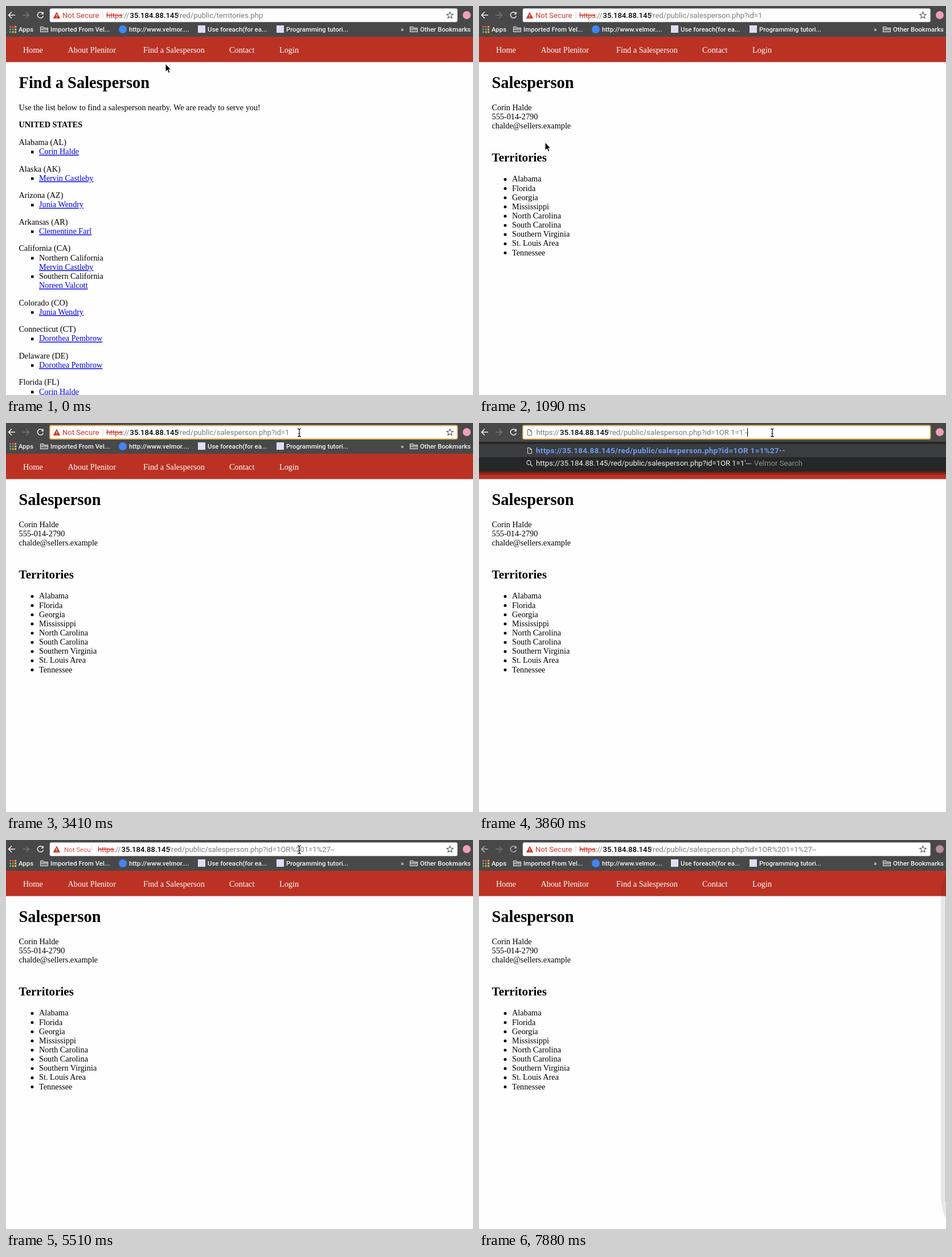
An HTML page for the animation above (8000 ms loop, 820x683 px).

```html
<!DOCTYPE html>
<html lang="en">
<head>
<meta charset="utf-8">
<title>Find a Salesperson</title>
<style>
  html, body { margin: 0; width: 100%; height: 100%; overflow: hidden; background: #fefefe; }
  svg { display: block; width: 820px; height: 683px; }
  text { font: 14.27px "Liberation Serif", Times, serif; white-space: pre; }
  .h1 { font-size: 28.5px; font-weight: 700; }
  .h2 { font-size: 21.1px; font-weight: 700; }
  .b { font-weight: 700; }
  .nav { fill: #fff; }
  .link { fill: #00e; text-decoration: underline; }
  .ui, .ip, .hit { font: 13.1px Roboto, "Liberation Sans", sans-serif; }
  .ip { font-weight: 500; }
  .hit { font-size: 13.4px; font-weight: 700; letter-spacing: .35px; fill: #6c9df5; }
  .mark { font: 500 11.4px Roboto, "Liberation Sans", sans-serif; fill: #f4f4f4; }
  .tight { letter-spacing: -.3px; }
</style>
</head>
<body>
<svg id="stage" viewBox="0 0 820 683"></svg>
<script>
const stage = document.getElementById('stage');
const LOOP = 8000, LINE = 16.2, GAP = 14.2;
const RED = '#d0372b', GRAY = '#7b7b7b';
const IP = '35.184.88.145', PERSON = '/red/public/salesperson.php?id=1';

const text = (x, y, s, cls = '', attr = '') => `<text x="${x}" y="${y}" class="${cls}" ${attr}>${s}</text>`;
const rect = (x, y, w, h, fill, attr = '') => `<rect x="${x}" y="${y}" width="${w}" height="${h}" fill="${fill}" ${attr}/>`;
const path = (d, stroke, fill = 'none', w = 1.5, attr = '') =>
  `<path d="${d}" stroke="${stroke}" fill="${fill}" stroke-width="${w}" ${attr}/>`;
const disc = (x, y, r, fill) => `<circle cx="${x}" cy="${y}" r="${r}" fill="${fill}"/>`;
const fill = c => `fill="${c}"`;
const during = (t, a, b) => t >= a && t < b;
// last entry whose time has been reached
const held = (keys, t) => keys.filter(k => k[0] <= t).pop();

// Names starting with "*" are links; "-" starts a bulleted line.
const territories = [
  ['Alabama (AL)', '-*Corin Halde'],
  ['Alaska (AK)', '-*Mervin Castleby'],
  ['Arizona (AZ)', '-*Junia Wendry'],
  ['Arkansas (AR)', '-*Clementine Farl'],
  ['California (CA)', '-Northern California', '*Mervin Castleby', '-Southern California', '*Noreen Valcott'],
  ['Colorado (CO)', '-*Junia Wendry'],
  ['Connecticut (CT)', '-*Dorothea Pembrow'],
  ['Delaware (DE)', '-*Dorothea Pembrow'],
  ['Florida (FL)', '-*Corin Halde']
];

function listPage() {
  let out = text(22.5, 143.5, 'Find a Salesperson', 'h1') +
    text(22.5, 183, 'Use the list below to find a salesperson nearby. We are ready to serve you!') +
    text(22.5, 213.3, 'UNITED STATES', 'b');
  let y = 244;
  for (const block of territories) {
    block.forEach((s, i) => {
      if (s[0] === '-') out += rect(44, y - 6, 4.5, 4.5, '#000');
      out += text(i ? 58 : 22.5, y, s.replace(/^-?\*?/, ''), s.includes('*') ? 'link' : '');
      y += LINE;
    });
    y += GAP;
  }
  return out;
}

function personPage() {
  const places = ['Alabama', 'Florida', 'Georgia', 'Mississippi', 'North Carolina', 'South Carolina',
    'Southern Virginia', 'St. Louis Area', 'Tennessee'];
  return text(22.5, 143.5, 'Salesperson', 'h1') +
    ['Corin Halde', '555-014-2790', 'chalde@sellers.example'].map((s, i) => text(22.5, 183 + i * LINE, s)).join('') +
    text(22.5, 272.5, 'Territories', 'h2') +
    places.map((s, i) => disc(46, 304.4 + i * 16.15, 2.5, '#000') + text(58, 308.4 + i * 16.15, s)).join('');
}

const navBar = rect(0, 54, 820, 44.5, '#bb3224') +
  [[30, 'Home'], [108.5, 'About Plenitor'], [241, 'Find a Salesperson'], [392, 'Contact'], [480, 'Login']]
    .map(([x, s]) => text(x, 82, s, 'nav')).join('');

const folder = x => path(`M${x} 45.5V36.5h5l1.5 2h6.5v7zM${x} 40.5h13`, '#d8d8d8', '#777', 1.1);

function bookmarks(hover) {
  const dots = ['#e8503f', '#e8503f', '#f0a23c', '#4caf50', '#4a8af4', '#f5c242', '#4caf50', '#f0a23c', '#f5c242'];
  return dots.map((c, i) => rect(6 + i % 3 * 4.6, 35 + (i / 3 | 0) * 4.6, 3, 3, c)).join('') +
    (hover ? rect(471, 32, 132, 18, '#686868', 'rx="3"') : '') +
    folder(60.5) + disc(205, 41, 7, '#4285f4') +
    rect(337, 34, 13, 13, '#dedef2') + rect(475, 34, 13, 13, '#dedef2') + folder(709.5) +
    [[22, 'Apps'], [78, 'Imported From Vel...'], [216, 'http://www.velmor....'], [354, 'Use foreach(for ea...'],
     [492, 'Programming tutori...'], [693, '»'], [727, 'Other Bookmarks']]
      .map(([x, s]) => text(x, 45, s, 'mark')).join('');
}

function browserBar(dim, focus) {
  const c = dim ? '#b4b4b4' : '#f2f2f2';
  return rect(0, 0, 820, 54, '#494849') +
    path('M16 16H5M10 10.5L4.5 16L10 21.5', c) +
    path('M29 16H40M35 10.5L40.5 16L35 21.5', '#757575') +
    path('M64.5 12.5A5.2 5.2 0 1 0 65.5 17.5', c) + path('M66 10V14.8H61.2Z', 'none', c) +
    rect(77, 4.5, 715.5, 23.5, '#fff', `rx="2.5" stroke="${focus ? '#e9b660' : '#d8d8d8'}" stroke-width="${focus ? 1.8 : .6}"`) +
    disc(809, 16, 7, dim ? '#b98d9a' : '#eda0b6');
}

const star = path(Array.from({ length: 10 }, (_, i) => {
  const a = i * Math.PI / 5, r = i % 2 ? 2.7 : 6;
  return (i ? 'L' : 'M') + (779.5 + r * Math.sin(a)) + ' ' + (16.5 - r * Math.cos(a));
}).join('') + 'Z', '#555', 'none', 1.1);

const address = (x, route, scheme) =>
  scheme + text(x + 41.5, 21, IP, 'ip') + text(x + 123.7, 21, route, 'ui', fill(GRAY));

function siteAddress(t) {
  // the warning chip widens and pushes the address right
  const x = held([[0, 176], [5190, 100], [5350, 130], [5510, 161], [5660, 171], [5810, 176]], t)[1];
  const moving = x < 176, sep = x - (moving ? 11 : 6.5);
  const route = t < 930 ? '/red/public/territories.php' : t < 5190 ? PERSON : PERSON + 'OR%201=1%27--';
  return (during(t, 2210, 2660) ? rect(176, 8, 316, 16, '#b4d6fb') : '') +
    path('M89 11L94.7 21.5H83.3Z', RED, RED, .8) + rect(88.4, 14.5, 1.2, 3.5, '#fff') + rect(88.4, 19, 1.2, 1.2, '#fff') +
    `<clipPath id="chip">${rect(77, 5, sep - 79, 22, '#000')}</clipPath>` +
    text(moving ? 102 : 99, 21, 'Not Secure', 'ui', `fill="${RED}" clip-path="url(#chip)"` +
      (moving ? ' style="font-size:11.5px" opacity=".85"' : '')) +
    rect(sep, 10, 1, 13, moving ? '#eec5c1' : '#d6d6d6') +
    address(x, route, text(x, 21, `<tspan fill="${RED}">https</tspan>://`, 'ui tight', fill(GRAY)) +
      rect(x, 16, 28.5, 1.2, RED)) + star +
    (during(t, 2810, 3410) ? rect(492, 9, 1, 15, '#000') : '');
}

const sheet = (y, c) => path(`M85.5 ${y}h4l3 3v7h-7zM89.5 ${y}v3h3`, c, 'none', 1);

function suggestions(t) {
  const typed = PERSON + "OR 1=1'--";
  return '<linearGradient id="fade" x2="0" y2="1"><stop stop-opacity=".5"/><stop offset="1" stop-opacity="0"/></linearGradient>' +
    rect(0, 85, 820, 8, 'url(#fade)') + rect(0, 33, 820, 52, '#272727') + rect(0, 37, 820, 23, '#3b3c3e') +
    sheet(11.5, '#666') + address(100.5, typed, text(100.5, 21, 'https://', 'ui tight', fill(GRAY))) +
    (during(t, 4450, 5050) ? '' : rect(471, 9, 1, 15, '#000')) +
    sheet(43.5, '#ddd') + text(100, 53, 'https://' + IP + PERSON + 'OR 1=1%27--', 'hit') +
    '<circle cx="87.5" cy="69.5" r="3.5" fill="none" stroke="#ccc" stroke-width="1.3"/>' + path('M90 72l4 4', '#ccc') +
    text(100, 75, 'https://' + IP + typed, 'ui', fill('#f2f2f2')) +
    text(476, 75, '- Velmor Search', 'ui', fill('#929292'));
}

const beam = 'M-3-7Q0-7 0-5Q0-7 3-7M0-5V5M-3 7Q0 7 0 5Q0 7 3 7M-1.5 1.5H1.5';
const shapes = {
  arrow: path('M0 0V14L3.3 11L5.6 16.2L8 15.1L5.7 10.2H10Z', '#fff', '#000', 1),
  hand: path('M-1.5 8V1Q0-1 1.5 1V6L8 7.5Q9.5 8 9 10L7.5 15H0L-5 9Q-5 7-3 7.5Z', '#000', '#fff', 1),
  beam: path(beam, '#fff', 'none', 2.6, 'opacity=".7"') + path(beam, '#000', 'none', 1.2)
};

const moves = [
  [0, 280, 101.5, 'arrow'], [150, 262, 122, 'arrow'], [300, 205, 182, 'arrow'], [450, 140, 236, 'arrow'],
  [610, 112, 253, 'hand'], [930, 110, 250, 'arrow'], [1090, 116, 239.5, 'arrow'], [1230, 155, 205, 'arrow'],
  [1380, 290, 112, 'arrow'], [1600, 450, 40, 'arrow'], [1900, 520, 18, 'beam'], [2060, 524.5, 15.5, 'beam'],
  [2510, 520, 16, 'beam'], [2660, 515, 17, 'beam'], [5960, 535, 36, 'arrow'], [6100, 700, 60, 'arrow'], [6250, 840, 70, 'arrow']
];

function pointer(t) {
  const [, x, y, kind] = held(moves, t);
  return `<g transform="translate(${x} ${y})">${shapes[kind]}</g>`;
}

// soft edge of a window sliding over the right side
const overlap = path('M820 62Q811 72 811 100V620Q812 652 820 664Z', 'none', 'rgba(0,0,0,.09)') +
  rect(819, 100, 1, 535, 'rgba(0,0,0,.2)');

function scene(t) {
  const typing = during(t, 3860, 5190);
  return rect(0, 0, 820, 683, '#fefefe') + (t < 930 ? listPage() : personPage()) + navBar +
    browserBar(t >= 7080, during(t, 1900, 5190)) + bookmarks(during(t, 5960, 6100)) +
    (typing ? suggestions(t) : siteAddress(t)) + (t >= 7080 ? overlap : '') + pointer(t);
}

let shown = '';
function tick() {
  const next = scene(performance.now() % LOOP);
  if (next !== shown) stage.innerHTML = shown = next;
  requestAnimationFrame(tick);
}
tick();
</script>
</body>
</html>
```
